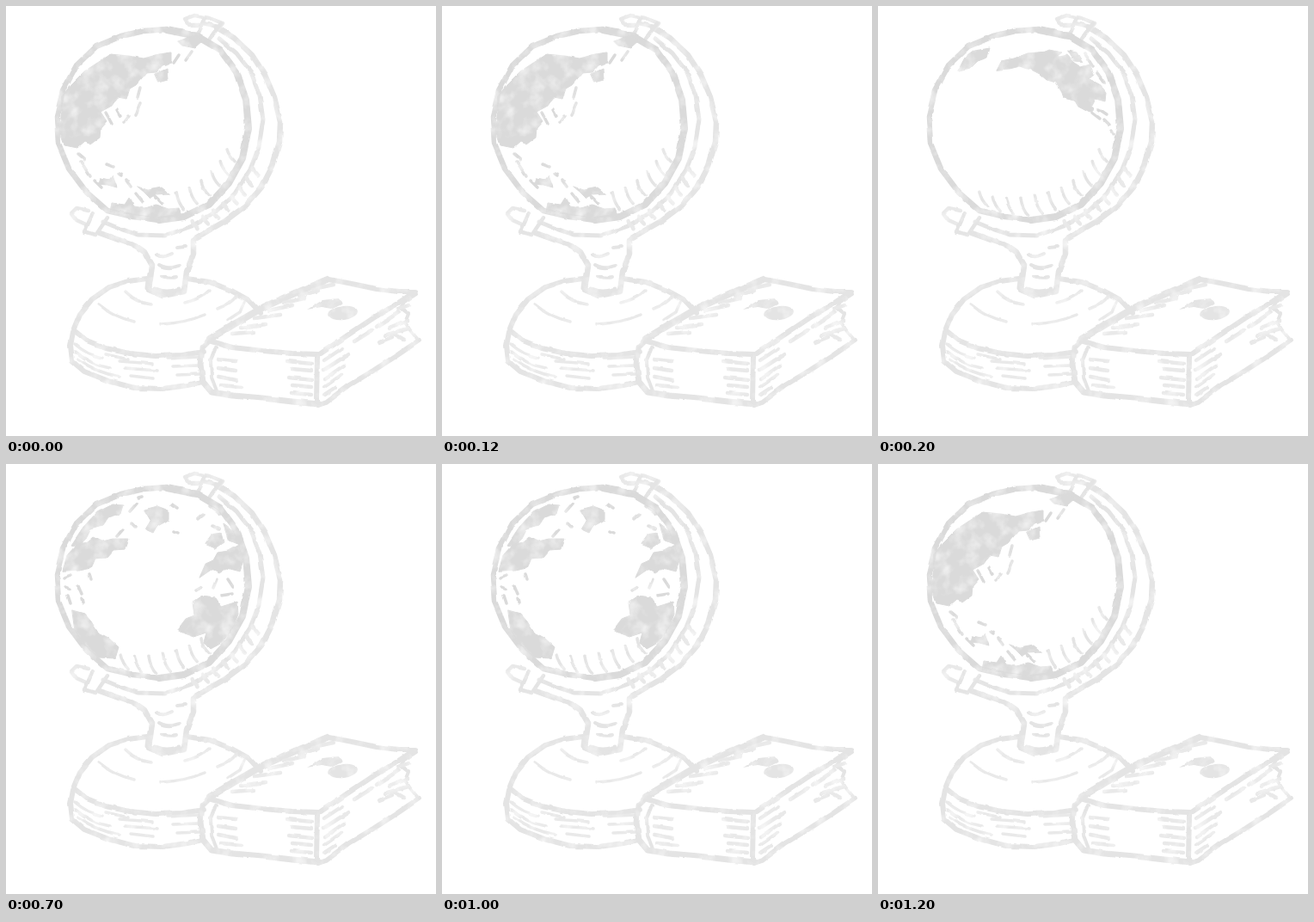
An HTML page for the animation above (1400 ms loop, 500x500 px).

```html
<!DOCTYPE html>
<html lang="en">
<head>
<meta charset="utf-8">
<title>Spinning globe</title>
<style>
html, body { margin: 0; width: 100%; height: 100%; overflow: hidden; background: #fff; }
svg { display: block; width: 100vw; height: 100vh; }
.ink { fill: none; stroke-linecap: round; stroke-linejoin: round; stroke: #e4e4e4; }
.faint { stroke: #e9e9e9; }
.dark { stroke: #dadada; }
.land { fill: #dadada; stroke: #dadada; stroke-width: 1; stroke-linejoin: round; stroke-linecap: round; opacity: 0; }
.land .dab { fill: none; stroke-width: 3.5; }
</style>
</head>
<body>
<svg viewBox="0 0 500 500">
<defs>
  <filter id="brush" filterUnits="userSpaceOnUse" x="0" y="0" width="500" height="500" color-interpolation-filters="sRGB">
    <feTurbulence type="fractalNoise" baseFrequency=".06" numOctaves="3" seed="4" result="noise"/>
    <feDisplacementMap in="SourceGraphic" in2="noise" scale="3" xChannelSelector="R" yChannelSelector="G"/>
    <feGaussianBlur stdDeviation=".7" result="soft"/>
    <feColorMatrix in="noise" values="0 0 0 0 0  0 0 0 0 0  0 0 0 0 0  0 0 0 1.4 .22" result="grain"/>
    <feComposite in="soft" in2="grain" operator="in"/>
  </filter>
</defs>

<g filter="url(#brush)">
  <!-- base -->
  <g class="ink" stroke-width="6">
    <path d="M164 317L142 320 120 327 100 341 86 358 79 375"/>
    <path d="M210 317L237 321 262 331 282 342 296 357"/>
    <path d="M80 378L94 389 116 398 144 404 174 407 205 406 230 402"/>
    <path d="M78 379L75 395 77 413 91 425 119 436 149 444 182 445 211 441 228 437"/>
  </g>
  <g class="ink faint" stroke-width="3.5">
    <path d="M139 333Q149 344 169 347M208 345Q228 340 236 331"/>
    <path d="M108 347Q124 361 149 367M180 370Q207 369 231 359M246 352Q262 346 268 337M277 344L272 356 258 365"/>
    <path d="M80 393Q94 406 112 409M81 402Q98 417 121 421M84 411Q107 427 132 431M116 405L142 411M132 413L170 416M139 421L175 424M145 430L171 433M188 410L225 408M194 419L224 418M199 429L225 428"/>
  </g>

  <!-- stem and arm -->
  <g class="ink" stroke-width="6.5">
    <path d="M109 264L134 273 151 279 161 286 170 302 166 330 182 337 207 332 210 309 218 288 218 273"/>
    <path d="M245 25L265 37 286 57 301 80 312 106 319 135 318 158 310 186 297 211 279 232 255 250 220 270"/>
  </g>
  <g class="ink" stroke-width="5">
    <path d="M248 38L268 55 285 77 295 104 299 132 294 164 284 190 266 218 243 240 216 256 185 267 153 266 125 256 113 251"/>
    <path d="M164 328L165 318M206 330L210 318M173 329Q187 335 201 329"/>
    <path d="M175 289Q182 294 193 288M178 301Q188 307 201 302M181 314Q190 317 198 315M199 281L209 280" stroke-width="4"/>
  </g>
  <g id="armHatch" class="ink faint" stroke-width="4.5"></g>

  <!-- pivots -->
  <g class="ink" stroke-width="4.5">
    <path class="faint" d="M227 22L213 22 208 15 219 11 236 14 252 20 247 27"/>
    <path d="M231 14L221 35M250 20L237 38M229 20L246 24"/>
    <path class="faint" d="M96 238L82 235 76 241 82 249 93 254"/>
    <path d="M101 241L91 263M118 246L106 264M91 262L104 266"/>
  </g>

  <!-- book -->
  <g class="ink" stroke-width="6">
    <path d="M237 387L265 370 300 350 338 333 374 318" stroke-width="8"/>
    <path d="M376 318L402 323 431 329 456 332 476 332 455 346 427 363 397 383 366 404"/>
    <path d="M239 390L263 397 299 401 333 404 363 405"/>
    <path d="M239 386L228 397 226 417 229 437 239 449 264 453 298 456 333 460 363 463" stroke-width="7"/>
    <path d="M244 397L238 412 239 432 246 450" stroke-width="4"/>
    <path d="M362 407L361 459M363 464L372 461 399 441 427 424 455 406 480 389"/>
    <path d="M477 335L463 344 459 351 468 358 464 368 470 377 479 388" stroke-width="4"/>
  </g>
  <g class="ink faint" stroke-width="4.5">
    <path d="M273 374L302 370M263 381L289 379M289 363L319 359M306 354L333 348M323 345L348 340M341 337L363 331M357 329L381 324"/>
    <path d="M246 411L267 413M247 421L267 424M247 431L268 435M250 441L273 443"/>
    <path d="M327 413L356 416M332 422L355 424M329 432L356 435M333 441L355 443M332 450L355 452"/>
    <path d="M370 412L391 398M370 423L398 405M371 433L393 418M370 443L390 429M370 452L382 444M405 390L426 377M431 373L457 356"/>
    <path d="M440 383L468 375M446 374L468 366M434 391L449 385M457 352L468 348M451 381L463 388"/>
  </g>
  <g fill="#e4e4e4">
    <path d="M350 353L368 342 386 340 392 346 380 352 367 350Z"/>
    <ellipse cx="392" cy="357" rx="17" ry="8" transform="rotate(-8 392 357)"/>
  </g>

  <!-- globe rim -->
  <g class="ink dark">
    <path stroke-width="6.5" d="M187 27L160 29 134 35 105 47 82 69 66 98 59 129 61 160 73 189 94 217 118 238 148 245 178 249"/>
    <path stroke-width="8" d="M187 28L222 35 249 51 268 77 279 109 282 142 275 177 259 206 236 231 207 245 178 249"/>
  </g>
  <g id="globeHatch" class="ink" stroke-width="3.5"></g>
</g>

<g filter="url(#brush)">
  <!-- Asia and Australia -->
  <g class="land" data-spans="0-200 1200-1400">
    <path d="M65 105L76 91 91 76 111 63 122 56 143 58 160 61 178 56 192 54 192 66 182 69 175 77 163 78 151 92 144 96 140 108 130 106 123 116 110 123 117 134 110 142 109 153 98 161 91 158 83 165 68 162 63 147 64 126Z"/>
    <path d="M173 79L187 73 188 85 177 88Z"/>
    <path d="M200 41L216 35 230 40 220 49 205 46Z"/>
    <path d="M108 207L110 200 120 202 124 197 129 211 118 208Z"/>
    <path d="M153 210L165 214 181 211 191 219 174 220 168 224 160 216Z"/>
    <path d="M121 239L123 229 138 231 143 223 149 233 162 235 174 231 189 236 201 235 204 244 177 246 145 242Z"/>
    <path class="dab" d="M156 95L153 106M156 112L151 127M143 128L137 136M116 124L123 137M129 121L133 128M216 53L209 63M201 57L195 66"/>
    <path class="dab" d="M84 172L91 178M87 181L98 198M103 203L111 211M117 184L125 187M131 195L134 197M140 203L145 210M151 218L159 228M173 222L181 230"/>
  </g>

  <!-- North America -->
  <g class="land" data-spans="200-700">
    <path d="M93 75L101 60 112 52 130 49 127 60 116 64 108 72Z"/>
    <path d="M138 74L143 64 158 61 174 55 197 53 211 59 220 57 228 66 236 71 246 68 251 80 245 85 258 92 265 101 264 111 253 108 249 116 238 114 228 110 216 107 213 98 207 89 196 86 188 79 178 74 164 70 152 73Z"/>
    <path d="M188 56L199 51 214 54 205 61ZM221 52L231 54 238 65 228 64Z"/>
    <path d="M228 108L244 113 252 120 246 124 233 117Z"/>
    <path class="dab" d="M240 55L250 71M255 78L263 89M249 124L258 131M257 120L266 126M263 132L269 138M272 145L274 149"/>
  </g>

  <!-- Atlantic -->
  <g class="land" data-spans="700-1200">
    <path d="M76 94L90 73 106 56 124 47 136 48 133 58 119 62 113 71 99 75 93 87 84 95Z"/>
    <path d="M66 125L71 106 82 94 94 91 101 85 112 90 124 87 143 87 139 99 125 100 117 109 104 110 99 121 84 124Z"/>
    <path d="M161 53L176 49 189 54 189 65 175 73 171 80 162 76 168 66Z"/>
    <path d="M77 170L91 174 99 183 107 196 119 202 131 213 127 226 108 225 91 211 80 193Z"/>
    <path d="M225 132L232 116 241 112 246 103 258 101 270 94 276 113 272 125 257 121 248 127 239 123Z"/>
    <path d="M200 192L209 180 219 176 217 161 228 154 243 156 250 166 269 160 270 175 262 194 251 208 238 215 230 207 233 196 218 201 207 197Z"/>
    <path d="M231 93L239 82 250 80 253 91 243 98ZM253 70L264 78 271 94 259 89Z"/>
    <path class="dab" d="M144 55L152 46M154 39L158 38M146 69L150 73M136 76L129 84M195 78L200 80M193 47L199 51M223 64L229 59M237 49L249 58M241 72L248 76"/>
    <path class="dab" d="M68 133L75 130M69 143L74 145M72 153L75 162M84 142L88 151M88 157L89 162M97 128L99 134M245 134L241 144M258 134L264 143M250 153L263 151M221 147L228 143"/>
  </g>
</g>
</svg>

<script>
const LOOP = 1400;
const SVG_NS = "http://www.w3.org/2000/svg";

function addStroke(parent, d) {
  const path = document.createElementNS(SVG_NS, "path");
  path.setAttribute("d", d);
  parent.append(path);
  return path;
}

// Shows an element only during spans such as "0-200 1200-1400".
function showDuring(element, spans) {
  const steps = new Map([[0, 0]]);
  for (const span of spans.split(" ")) {
    const [start, end] = span.split("-").map(Number);
    steps.set(start, 1);
    if (end < LOOP) steps.set(end, 0);
  }
  const frames = [...steps].sort((a, b) => a[0] - b[0])
    .map(([time, opacity]) => ({ offset: time / LOOP, opacity, easing: "step-end" }));
  frames.push({ offset: 1, opacity: frames.at(-1).opacity });
  const motion = element.animate(frames, { duration: LOOP, iterations: Infinity });
  motion.startTime = 0;
}

// Shading along the lower edge of the globe; the land hides part of it.
const globeHatch = document.getElementById("globeHatch");
for (let i = 0; i < 11; i++) {
  const angle = (116 - i * 9.2) * Math.PI / 180;
  const x = 171 + 103 * Math.cos(angle);
  const y = 138 + 105 * Math.sin(angle);
  const length = 21 - Math.abs(i - 4) * 1.2;
  const stroke = addStroke(globeHatch,
    `M${x - 8} ${y - length}Q${x - 6} ${y - 7} ${x + 1} ${y}`);
  const spans = [];
  if (i > 4) spans.push("0-200");
  spans.push("200-700");
  if (i > 0 && i < 8) spans.push("700-1200");
  if (i > 4) spans.push("1200-1400");
  showDuring(stroke, spans.join(" "));
}

// Shading inside the arm.
const armHatch = document.getElementById("armHatch");
for (let i = 0; i < 8; i++) {
  const angle = (27 + i * 5.8) * Math.PI / 180;
  const x = 171 + 138 * Math.cos(angle);
  const y = 138 + 131 * Math.sin(angle);
  addStroke(armHatch, `M${x - 7} ${y - 9}Q${x - 5} ${y - 3} ${x - 1} ${y}`);
}

for (const land of document.querySelectorAll(".land")) showDuring(land, land.dataset.spans);
</script>
</body>
</html>
```
